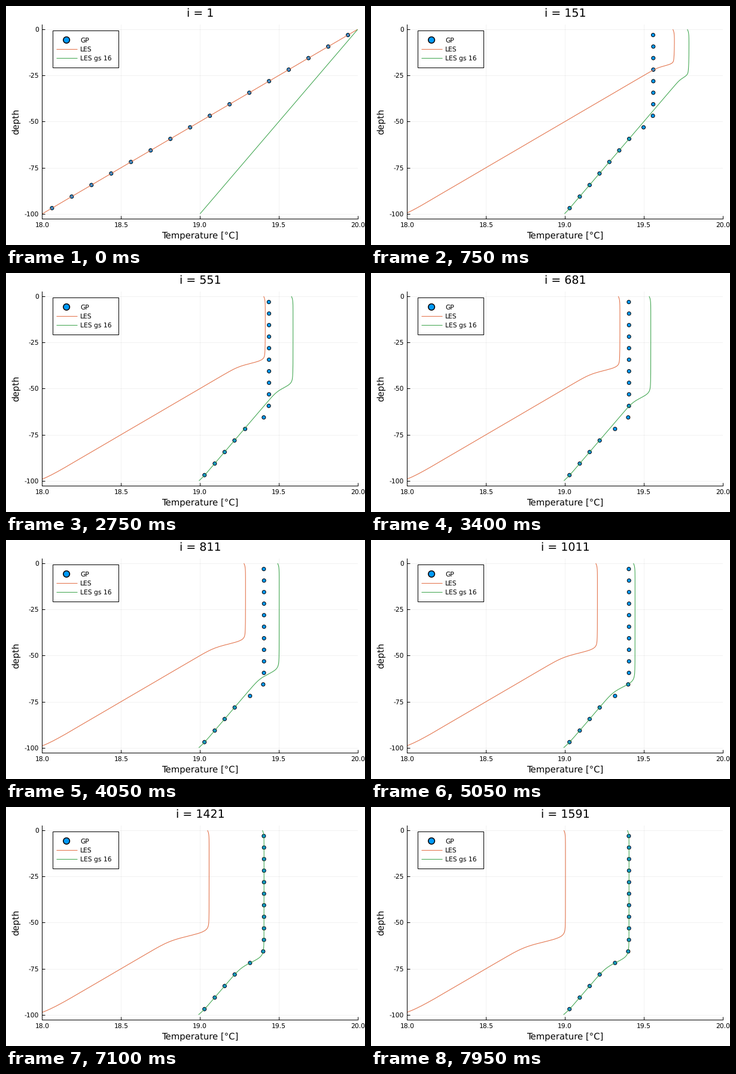
Recreate the animation shown at these times as a matplotlib script. Size 600 by 400 pixels, loop 8000 ms.

```python
import numpy as np
import matplotlib.pyplot as plt
from matplotlib.animation import FuncAnimation
from matplotlib.patches import Circle, Ellipse, Rectangle

W, H = 600, 400
PT = 0.72                      # points per pixel at 100 dpi
FRAMES, INTERVAL = 160, 50
BLUE, RED, GREEN = "#009afa", "#e26f46", "#3da44d"

# Pixel box of the plot area and the scales inside it
LEFT, RIGHT, TOP, BOTTOM = 60.4, 588, 31, 355.6
PX_PER_DEG = (RIGHT - LEFT) / 2
Y_ZERO, PX_PER_M = 38.9, 3.09

plt.rcParams.update({"font.family": "DejaVu Sans", "text.hinting": "none"})

fine = (np.arange(256) + 0.5) * 100 / 256
coarse = (np.arange(16) + 0.5) * 100 / 16

# gradient, cooling rate, interface ratio, interface shift, floor cooling
LES = (0.02, 0.025, 1.16, 2.2, 0.05)
LES16 = (0.01, 0.0175, 1.185, 0.3, 0.0125)
LAST16 = 1153                  # the second run stops here
GP_LEAD = 483


def profile(s, t, run):
    """Temperature at depth s for a layer cooled from above during t steps."""
    grad, rate, ratio, shift, floor = run
    line = 20 - grad * s
    if t <= 0:
        return line
    drop = rate * np.sqrt(t)
    h = drop / grad
    centre = h * (ratio + shift / (h + 5))
    width = min(0.3 + 0.022 * h, 0.08 * h)
    mix = 0.5 * (1 + np.tanh((s - centre) / (2 * width)))
    layer = 20 - drop - 0.01 * np.exp(np.minimum(s - centre, 8) / 4)
    temp = layer * (1 - mix) + line * mix
    age = np.sqrt(t / 1590)
    temp -= 0.011 * np.exp(-s / 1.5)
    temp -= floor * age * np.exp(-(100 - s) / (1.3 + 1.2 * age))
    return temp


fig = plt.figure(figsize=(W / 100, H / 100), dpi=100, facecolor="white")
ax = fig.add_axes([LEFT / W, 1 - BOTTOM / H, (RIGHT - LEFT) / W, (BOTTOM - TOP) / H])
ax.set_xlim(18, 20)
ax.set_ylim((Y_ZERO - BOTTOM) / PX_PER_M, (Y_ZERO - TOP) / PX_PER_M)
ax.set_xticks(np.arange(18, 20.1, 0.5))
ax.set_yticks(np.arange(-100, 1, 25))
ax.tick_params(direction="in", length=5 * PT, width=PT,
               labelbottom=False, labelleft=False)
ax.set_axisbelow(True)
ax.grid(color="black", alpha=0.05, linewidth=PT)
for side in ("top", "right"):
    ax.spines[side].set_visible(False)
for side in ("left", "bottom"):
    ax.spines[side].set_linewidth(PT)

# Overlay in pixel units for text and legend
page = fig.add_axes([0, 0, 1, 1], facecolor="none")
page.set_xlim(0, W)
page.set_ylim(H, 0)
page.axis("off")


def label(x, y, text, px, ha="center", **kw):
    return page.text(x, y, text, fontsize=px * PT, ha=ha, va="baseline",
                     rotation_mode="anchor", **kw)


TITLE, GUIDE, SMALL = 19, 14.9, 10.75
title = label(324.4, 17.7, "", TITLE)
label(324.6, 388.9, "Temperature [°C]", GUIDE)
label(21.2, 193.1, "depth", GUIDE, rotation=90)
for k in range(5):
    label(LEFT + k * PX_PER_DEG / 2, 369.6, f"{18 + k / 2:.1f}", SMALL)
    label(55, Y_ZERO + 25 * k * PX_PER_M + 3.8, str(-25 * k), SMALL, ha="right")

page.add_patch(Rectangle((78, 41), 110, 61.6, facecolor="white",
                         edgecolor="black", linewidth=PT))
page.add_patch(Circle((101.1, 56.9), 5.3, facecolor=BLUE, edgecolor="black",
                      linewidth=1.5 * PT))
for y, color in ((72.1, RED), (87.1, GREEN)):
    page.plot([83.5, 119], [y, y], color=color, linewidth=PT,
              solid_capstyle="butt")
for y, name in ((61, "GP"), (76.2, "LES"), (91.2, "LES gs 16")):
    label(124.3, y, name, SMALL, ha="left")

DOT = 6
dots = [ax.add_patch(Ellipse((18, -s), DOT / PX_PER_DEG, DOT / PX_PER_M,
                             facecolor=BLUE, edgecolor="black", linewidth=PT))
        for s in coarse]
red, = ax.plot([], [], color=RED, linewidth=1.05 * PT)
green, = ax.plot([], [], color=GREEN, linewidth=1.05 * PT)


def draw(frame):
    step = 10 * frame
    title.set_text(f"i = {step + 1}")
    red.set_data(profile(fine, step, LES), -fine)
    green.set_data(profile(fine, min(step, LAST16), LES16), -fine)
    # The prediction starts on the steep profile, then joins the weaker one
    if frame == 0:
        guess = profile(coarse, 0, LES)
    else:
        guess = profile(coarse, min(step + GP_LEAD, LAST16), LES16)
    for dot, temp, s in zip(dots, guess, coarse):
        dot.set_center((temp, -s))
    return title, red, green, *dots


anim = FuncAnimation(fig, draw, frames=FRAMES, interval=INTERVAL,
                     repeat=True, repeat_delay=0, blit=False)
plt.show()
```
